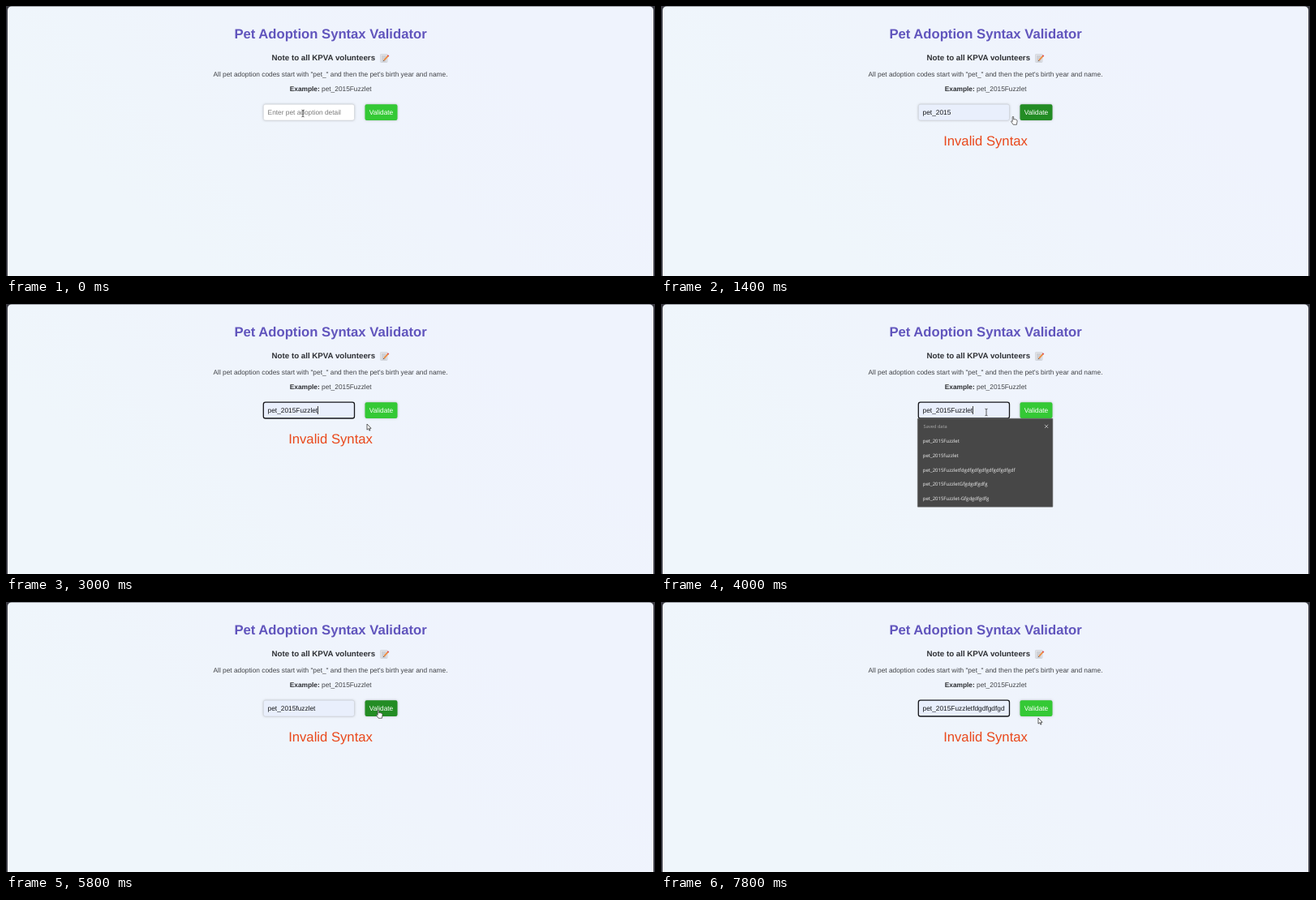
These frames come from a looping animation (800 by 333 pixels, 8000 ms). An HTML page with a canvas:

```html
<!DOCTYPE html>
<html lang="en">
<head>
<meta charset="utf-8">
<title>Pet Adoption Syntax Validator</title>
<style>
  html, body { margin: 0; width: 100%; height: 100%; overflow: hidden; background: #3b3b43; }
  canvas { display: block; width: 100vw; height: 100vh; }
</style>
</head>
<body>
<canvas id="stage" width="800" height="333"></canvas>
<script>
const ctx = document.getElementById('stage').getContext('2d');
const LOOP = 8000, STEP = 200;
const SANS = '"Liberation Sans", Arial, sans-serif';
const MENU = '"Open Sans", sans-serif';
const BODY = 8.34, LARGE = 16.67;
const ROW_TOP = 160, ROW_H = 17.65;

const base = 'pet_2015';
const saved = ['Fuzzlet', 'fuzzlet', 'Fuzzletfdg' + 'dfg'.repeat(6) + 'df',
  'FuzzletGfgdgdfgdfg', 'Fuzzlet-Gfgdgdfgdfg'].map(s => base + s);
const allSaved = [base, ...saved];

// Each state holds from its start time until the next one.
const states = [
  { t: 0, value: '' },
  { t: 200, value: '', focus: true, menu: allSaved },
  { t: 1000, value: base, focus: true },
  { t: 1200, value: base, result: 'Invalid' },
  { t: 1800, value: base, focus: true, menu: allSaved, result: 'Invalid' },
  { t: 2600, value: saved[0], focus: true, result: 'Invalid' },
  { t: 3400, value: saved[0], result: 'Valid' },
  { t: 3800, value: saved[0], focus: true, menu: saved, result: 'Valid' },
  { t: 5200, value: saved[1], focus: true, result: 'Valid' },
  { t: 5800, value: saved[1], result: 'Invalid' },
  { t: 6400, value: saved[1], focus: true, menu: saved, result: 'Invalid' },
  { t: 7400, value: saved[2], focus: true, result: 'Invalid' }
];

// Pointer path: time, x, y
const path = [
  [0, 366, 132], [200, 366, 132], [400, 362, 150], [800, 356, 170],
  [1000, 372, 168], [1200, 450, 133], [1400, 434, 136], [1800, 400, 132],
  [2000, 390, 150], [2400, 364, 187], [2600, 364, 187], [3000, 445, 148],
  [3200, 455, 136], [3400, 460, 133], [3800, 401, 133], [4000, 401, 133],
  [4400, 385, 155], [4800, 364, 185], [5000, 362, 188], [5200, 364, 187],
  [5600, 455, 135], [5800, 459, 133], [6400, 408, 133], [6600, 410, 145],
  [7000, 380, 195], [7200, 375, 205], [7400, 378, 203], [7800, 465, 143]
];

function pointerAt(t) {
  const i = path.findIndex(p => p[0] > t);
  if (i < 0) return path[path.length - 1].slice(1);
  const [a, b] = [path[i - 1], path[i]];
  const k = (t - a[0]) / (b[0] - a[0]);
  return [a[1] + (b[1] - a[1]) * k, a[2] + (b[2] - a[2]) * k];
}

function text(str, x, y, size, color, opt = {}) {
  ctx.font = `${opt.weight || 400} ${size}px ${opt.family || SANS}`;
  ctx.textAlign = opt.align || 'left';
  ctx.fillStyle = color;
  ctx.fillText(str, x, y);
  return ctx.measureText(str).width;
}

function box(x, y, w, h, r, fill, stroke, line = 1) {
  ctx.beginPath();
  ctx.roundRect(x, y, w, h, r);
  if (fill) { ctx.fillStyle = fill; ctx.fill(); }
  if (stroke) { ctx.strokeStyle = stroke; ctx.lineWidth = line; ctx.stroke(); }
}

function line(points, color, width) {
  ctx.beginPath();
  points.forEach(([x, y]) => ctx.lineTo(x, y));
  ctx.strokeStyle = color;
  ctx.lineWidth = width;
  ctx.stroke();
}

function shadow(on) {
  ctx.shadowColor = on ? 'rgba(0,0,0,.25)' : 'transparent';
  ctx.shadowBlur = on ? 3 : 0;
}

function drawMemo() {
  box(461.5, 59.5, 8.6, 10, 0.8, '#e3e4e8', '#bfc2ca', 0.5);
  for (let y = 62; y < 69; y += 2) line([[463, y], [468.5, y]], '#9da3ad', 0.6);
  line([[471.3, 61.2], [466, 67]], '#ef8a3c', 1.8);
  line([[471.6, 60.9], [470.7, 61.9]], '#d9485c', 1.9);
  line([[466, 67], [465.2, 68]], '#54463c', 0.9);
}

function drawPage() {
  const bg = ctx.createLinearGradient(560, 0, 240, 333);
  bg.addColorStop(0, '#eff3fd');
  bg.addColorStop(0.45, '#eff4fc');
  bg.addColorStop(1, '#eff6fb');
  ctx.fillStyle = '#3b3b43';
  ctx.fillRect(0, 0, 800, 333);
  box(2, 0.4, 796, 345, 5, bg);

  text('Pet Adoption Syntax Validator', 400, 39.7, 16.67, '#6155bd', { weight: 700, align: 'center' });
  text('Note to all KPVA volunteers', 327.6, 67.2, 9.72, '#2d2f33', { weight: 700 });
  drawMemo();
  text('All pet adoption codes start with "pet_" and then the pet\'s birth year and name.',
    400, 87, BODY, '#414347', { align: 'center' });
  const w = text('Example: ', 349.7, 105, BODY, '#2d2f33', { weight: 700 });
  text(saved[0], 349.7 + w, 105, BODY, '#414347');
}

function drawField(s, shown, caret) {
  shadow(!s.focus);
  box(317.3, 121.2, 112.2, 19.8, 2.6, shown ? '#e9effc' : '#ffffff');
  shadow(false);
  box(317.3, 121.2, 112.2, 19.8, 2.6, null, s.focus ? '#15161a' : '#c9ccd3', s.focus ? 1.3 : 0.5);
  ctx.save();
  ctx.beginPath();
  ctx.rect(322, 122, 102, 18);
  ctx.clip();
  const w = text(shown || 'Enter pet adoption detail', 322.6, 133.8, BODY, shown ? '#17191d' : '#7b7b7b');
  if (caret) {
    const x = 322.9 + (shown ? w : 0);
    line([[x, 126], [x, 136]], '#111', 0.8);
  }
  ctx.restore();
}

function drawButton(hover) {
  shadow(true);
  box(442.5, 121.2, 40, 19.8, 2.2, hover ? '#238c24' : '#34c935');
  shadow(false);
  text('Validate', 462.5, 133.8, BODY, '#fff', { align: 'center' });
}

function drawMenu(rows, active) {
  box(316.3, 141.2, 166.6, 20.8 + rows.length * ROW_H, 0.5, '#474747', '#6a6a6a', 0.6);
  text('Saved data', 323.6, 153, 5.7, '#a9a9a9', { family: MENU });
  line([[473, 148.8], [477.2, 153]], '#dcdcdc', 0.7);
  line([[477.2, 148.8], [473, 153]], '#dcdcdc', 0.7);
  rows.forEach((row, i) => {
    const y = ROW_TOP + i * ROW_H;
    if (i === active) box(318.5, y + 0.1, 162.3, 16.9, 1.5, '#716f71');
    text(row, 322.8, y + 11.2, 6, '#f3f3f3', { family: MENU });
  });
}

function drawArrow() {
  const p = new Path2D('M0 0V7.2L1.7 5.7L2.9 8.2L4 7.7L2.9 5.3H5.1Z');
  ctx.fillStyle = '#fff';
  ctx.strokeStyle = '#222';
  ctx.lineWidth = 0.7;
  ctx.fill(p);
  ctx.stroke(p);
}

function drawHand() {
  const p = new Path2D('M-.8 .7Q0-.2 .7 .7V4L2 3.6L3.2 4L4.4 4.4Q5.2 4.6 5.1 6L4.4 10.3H.2L-2.2 6.9Q-2.6 5.7-1.6 5.7L-.8 6.5Z');
  ctx.fillStyle = '#fff';
  ctx.strokeStyle = '#333';
  ctx.lineWidth = 0.7;
  ctx.fill(p);
  ctx.stroke(p);
}

function drawBeam() {
  line([[-1.6, -3.8], [0, -3.2], [1.6, -3.8]], '#333', 0.7);
  line([[0, -3.3], [0, 4.3]], '#333', 0.8);
  line([[-1.6, 4.8], [0, 4.2], [1.6, 4.8]], '#333', 0.7);
}

function draw(t) {
  const s = states.findLast(st => st.t <= t);
  const [x, y] = pointerAt(t);
  const overField = x > 317 && x < 430 && y > 121 && y < 141;
  const overButton = x > 433 && x < 483 && y > 121 && y < 142;
  const active = s.menu ? Math.floor((y - ROW_TOP) / ROW_H) : -1;
  const preview = s.menu && s.menu[active];
  const caret = s.focus && !preview && (t - s.t) % 1000 < 500;

  drawPage();
  drawField(s, preview || s.value, caret);
  drawButton(overButton);
  if (s.result) {
    text(s.result + ' Syntax', 400, 172, LARGE, s.result === 'Valid' ? '#34c935' : '#e9481b', { align: 'center' });
  }
  if (s.menu) drawMenu(s.menu, active);

  ctx.save();
  ctx.translate(x, y);
  (overButton ? drawHand : overField ? drawBeam : drawArrow)();
  ctx.restore();
}

ctx.textRendering = 'geometricPrecision';
const start = performance.now();
function tick() {
  const t = (performance.now() - start) % LOOP;
  draw(Math.floor(t / STEP) * STEP);
  requestAnimationFrame(tick);
}
tick();
</script>
</body>
</html>
```
